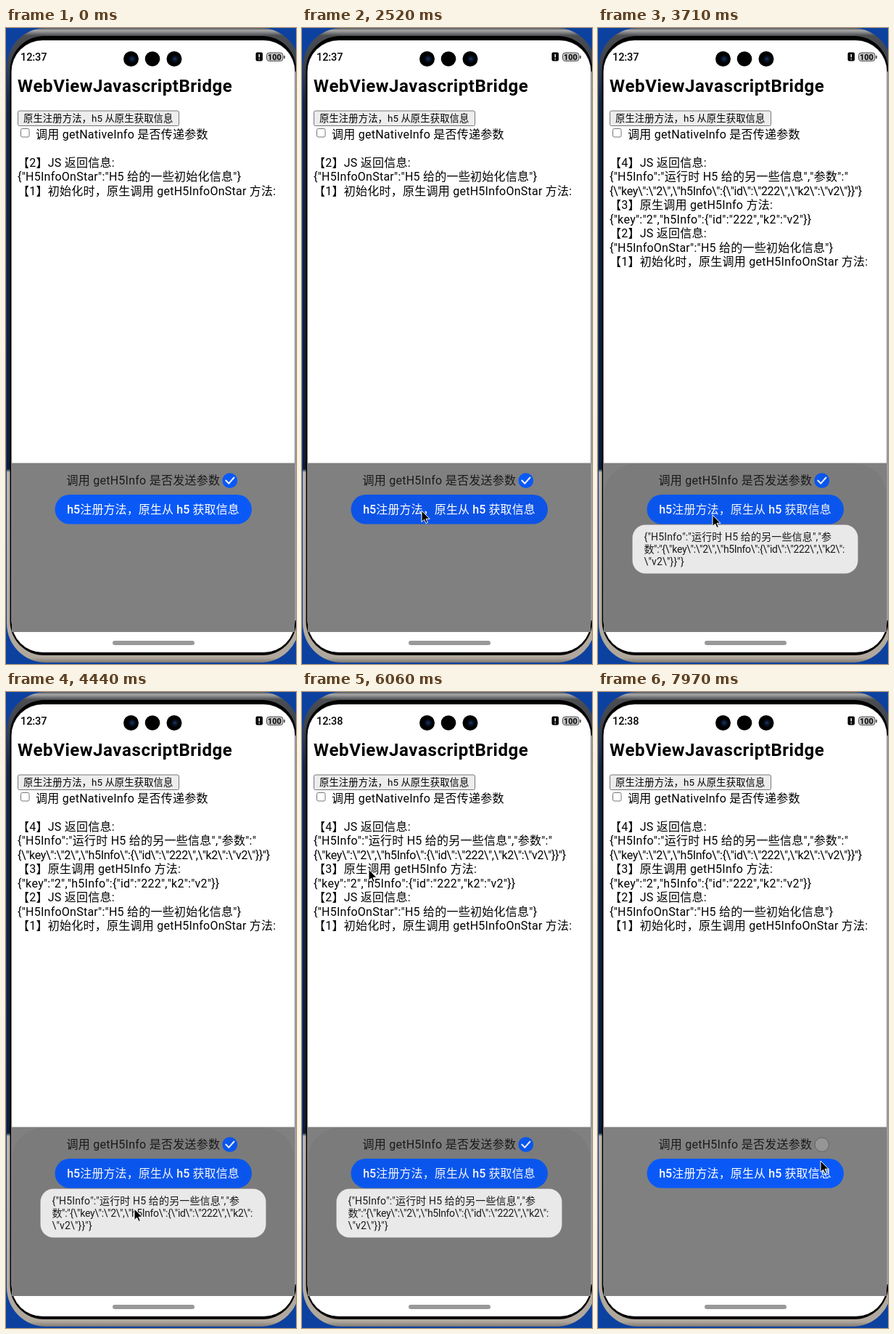
An HTML page that plays this animation: 400 px wide and 875 px high, repeating every 8 s.

```html
<!DOCTYPE html>
<html lang="zh-CN">
<head>
<meta charset="utf-8">
<title>WebViewJavascriptBridge</title>
<style>
  html, body { margin: 0; width: 100%; height: 100%; overflow: hidden; background: #0c419f; }
  svg { display: block; width: 400px; height: 875px; }
  text { font: 16px Roboto, "Noto Sans CJK SC", "Noto Sans CJK", sans-serif; font-kerning: none; letter-spacing: .25px; }
  .title { font-size: 24px; font-weight: 700; letter-spacing: .55px; }
  .small { font-size: 13.33px; letter-spacing: .1px; }
  .clock { font-size: 14.5px; font-weight: 500; letter-spacing: -.1px; }
  .level { font-size: 11px; font-weight: 700; letter-spacing: 0; }
  .cta { font-weight: 500; letter-spacing: .1px; }
  .tip text { font-size: 14px; letter-spacing: .15px; fill: #1a1a1a; }
  .esc, .tip .esc { letter-spacing: -.38px; }
</style>
</head>
<body>
<svg viewBox="0 0 400 875">
  <defs>
    <linearGradient id="metal" x2="0" y2="1">
      <stop offset="0" stop-color="#55585c"/>
      <stop offset=".004" stop-color="#a6a6a6"/>
      <stop offset=".012" stop-color="#4c4e52"/>
      <stop offset=".06" stop-color="#39404c"/>
      <stop offset=".12" stop-color="#1a2437"/>
      <stop offset=".695" stop-color="#131c2e"/>
      <stop offset=".7" stop-color="#bdb5aa"/>
      <stop offset=".992" stop-color="#b0a89d"/>
      <stop offset="1" stop-color="#807a72"/>
    </linearGradient>
    <radialGradient id="lens">
      <stop offset="0" stop-color="#1d3c78"/>
      <stop offset=".45" stop-color="#0c1830"/>
      <stop offset="1" stop-color="#04060b"/>
    </radialGradient>
    <clipPath id="panel"><path d="M8 598.500H398V831H8Z"/></clipPath>
  </defs>

  <!-- phone body -->
  <rect width="400" height="875" fill="#0c419f"/>
  <rect x="1" y="0" width="404" height="873" rx="54" fill="url(#metal)"/>
  <rect x="5.500" y="11" width="395" height="852" rx="47" fill="#000"/>
  <rect x="7.500" y="17" width="391" height="842" rx="43" fill="#fff"/>
  <path d="M399.200 60V815" stroke="#a2a2a2" stroke-width="1.600"/>

  <!-- status bar -->
  <text class="clock" id="clock" x="20" y="45">12:37</text>
  <circle cx="172.500" cy="42.500" r="10.500"/>
  <circle cx="202" cy="42.500" r="10.300"/>
  <circle cx="232" cy="42.500" r="10.500"/>
  <circle cx="174" cy="42.500" r="5.500" fill="url(#lens)"/>
  <circle cx="233" cy="42.500" r="5.500" fill="url(#lens)"/>
  <rect x="344.500" y="33.500" width="9.500" height="12" rx="2"/>
  <path d="M349.250 36v4.500m0 1.500v1.500" stroke="#fff" stroke-width="1.500"/>
  <rect x="359.500" y="34" width="22.500" height="11.500" rx="3.500" fill="#c4c4c4" stroke="#555"/>
  <path d="M384 38v4" stroke="#333" stroke-width="1.500"/>
  <text class="level" x="361" y="43.700">100</text>

  <!-- web page -->
  <text class="title" x="16" y="87.500">WebViewJavascriptBridge</text>
  <rect x="16.500" y="114" width="222" height="20.500" rx="2" fill="#ededed" stroke="#767676"/>
  <text class="small" x="24" y="129">原生注册方法，h5 从原生获取信息</text>
  <rect x="20.500" y="138.500" width="11.500" height="11.500" rx="2" fill="#fff" stroke="#767676"/>
  <text x="41" y="151.500">调用 getNativeInfo 是否传递参数</text>
  <g id="fresh">
    <text x="16" y="190.500">【4】JS 返回信息:</text>
    <text x="16" y="210">{"H5Info":"运行时 H5 给的另一些信息","参数":"</text>
    <text class="esc" x="16" y="229.500">{\"key\":\"2\",\"h5Info\":{\"id\":\"222\",\"k2\":\"v2\"}}"}</text>
    <text x="16" y="249">【3】原生调用 getH5Info 方法:</text>
    <text x="16" y="268.500">{"key":"2","h5Info":{"id":"222","k2":"v2"}}</text>
  </g>
  <g id="older">
    <text x="16" y="190.500">【2】JS 返回信息:</text>
    <text x="16" y="210">{"H5InfoOnStar":"H5 给的一些初始化信息"}</text>
    <text x="16" y="229.500">【1】初始化时，原生调用 getH5InfoOnStar 方法:</text>
  </g>

  <!-- native panel -->
  <path d="M8 598.500H398V831H8Z" fill="#808080"/>
  <text x="83.500" y="628" fill="#1a1a1a">调用 getH5Info 是否发送参数</text>
  <circle id="off" cx="308.800" cy="622.700" r="9.700" fill="#959595" stroke="#636363"/>
  <g id="on">
    <circle cx="308.800" cy="622.700" r="10.400" fill="#0a59f7"/>
    <path d="M303.300 622.500l4 4.200 7.200-8.200" fill="none" stroke="#fff" stroke-width="1.900" stroke-linecap="round" stroke-linejoin="round"/>
  </g>
  <rect id="send" x="67.500" y="642" width="271.500" height="40.500" rx="20.250"/>
  <text class="cta" x="203" y="668" fill="#fff" text-anchor="middle">h5注册方法，原生从 h5 获取信息</text>
  <g id="toast" class="tip">
    <rect x="8" y="599" width="390" height="260" rx="44" opacity=".04" clip-path="url(#panel)"/>
    <rect x="47.500" y="683.500" width="311" height="67" rx="18" fill="#e9e9e9"/>
    <text x="63.500" y="705">{"H5Info":"运行时 H5 给的另一些信息","参</text>
    <text class="esc" x="63.500" y="722">数":"{\"key\":\"2\",\"h5Info\":{\"id\":\"222\",\"k2\":</text>
    <text x="63.500" y="738.500">\"v2\"}}"}</text>
  </g>
  <rect x="147" y="843" width="113" height="6" rx="3" fill="#999"/>

  <path id="cursor" d="M0 0V15.500L3.600 12.200 6 17.500 8.400 16.400 6 11.300H11Z" stroke="#fff" stroke-width="1"/>
</svg>
<script>
  const LOOP = 8000, START = 590, STEP = 147.5;
  const $ = id => document.getElementById(id);
  const show = (id, on) => $(id).style.visibility = on ? "visible" : "hidden";

  // Pointer waypoints: step, x, y
  const path = [
    [0, 389, 261], [2, 290, 520], [3, 225, 690], [4, 172, 781], [5, 146, 752], [7, 180, 693],
    [8, 176, 678], [9, 170, 660], [10, 166, 654], [11, 165, 664], [20, 165, 664],
    [21, 158, 670], [23, 105, 700], [26, 177, 711], [28, 266, 717],
    [30, 318, 600], [32, 220, 385], [34, 95, 262], [36, 82, 240],
    [37, 92, 244], [42, 128, 249], [43, 195, 385], [44, 279, 570],
    [45, 305, 605], [46, 317, 640], [48, 304, 620], [49, 304, 620], [50, 307, 645]
  ];

  function pointer(n) {
    const i = path.findIndex(p => p[0] >= n);
    const b = path[i], a = path[Math.max(i - 1, 0)];
    const k = b[0] > a[0] ? (n - a[0]) / (b[0] - a[0]) : 0;
    return [a[1] + (b[1] - a[1]) * k, a[2] + (b[2] - a[2]) * k];
  }

  function draw(t) {
    const n = Math.floor((t - START) / STEP);
    const replied = n >= 14;
    show("cursor", n >= 0);
    if (n >= 0) $("cursor").setAttribute("transform", `translate(${pointer(n)})`);
    show("fresh", replied);
    $("older").setAttribute("transform", `translate(0 ${replied ? 97.5 : 0})`);
    $("send").setAttribute("fill", n === 13 ? "#0d53e6" : "#0a59f7");
    $("toast").setAttribute("opacity", n < 14 || n > 38 ? 0 : n === 14 ? .93 : n === 38 ? .5 : 1);
    $("clock").textContent = n < 32 ? "12:37" : "12:38";
    show("on", n < 50);
    show("off", n >= 50);
  }

  function frame() {
    draw(performance.now() % LOOP);
    requestAnimationFrame(frame);
  }
  frame();
</script>
</body>
</html>
```
